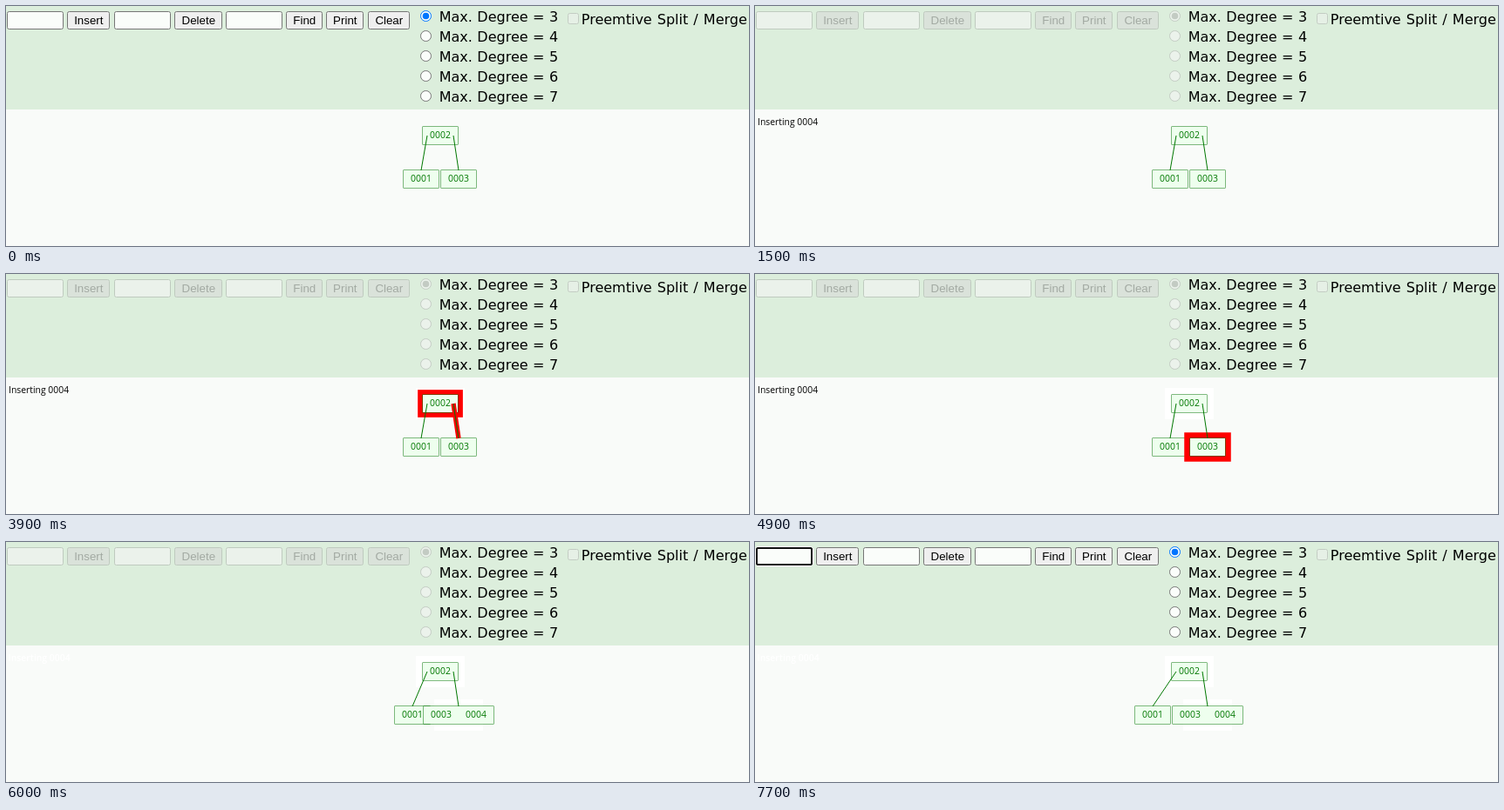
Animation of 852 by 276 pixels, one loop 8 s. Source, as an HTML page with a canvas:

```html
<!DOCTYPE html>
<html lang="en">
<head>
<meta charset="utf-8">
<title>B-Tree insertion</title>
<style>
  html, body { margin: 0; width: 100%; height: 100%; overflow: hidden; background: #f9fbf9; }
  canvas { display: block; width: 852px; height: 276px; }
</style>
</head>
<body>
<canvas id="stage" width="852" height="276"></canvas>
<script>
const ctx = document.getElementById('stage').getContext('2d');
const LOOP = 8000, STEP = 100;

const UI_FONT = '13.333px "Liberation Sans", Arial, sans-serif';
const LABEL_FONT = '16px "DejaVu Sans", Verdana, sans-serif';
const NODE_FONT = '10.4px "Open Sans", "Noto Sans", sans-serif';
const GREEN = '#007700', MINT = '#eeffee', RED = '#ff0000';

const FIELDS = [1, 124, 252];
const BUTTONS = [['Insert', 70, 49], ['Delete', 193, 55], ['Find', 321, 42], ['Print', 367, 43], ['Clear', 415, 48]];
const BUTTON_LOOK = {
  normal: ['#efefef', '#767676', '#000'],
  hover: ['#e5e5e5', '#4f4f4f', '#000'],
  active: ['#f5f5f5', '#8d8d8d', '#000'],
  disabled: ['#dae2da', '#bfcabf', '#a3aaa3']
};

const within = (t, from, to) => t >= from && t < to;
const clamp01 = v => Math.max(0, Math.min(1, v));

function text(str, x, y, font, color, align = 'left', gap = 0) {
  ctx.font = font;
  ctx.fillStyle = color;
  ctx.textAlign = align;
  ctx.wordSpacing = gap + 'px';
  ctx.fillText(str, x, y);
}

function outline(x, y, w, h, r, color, width) {
  ctx.beginPath();
  ctx.roundRect(x, y, w, h, r);
  ctx.strokeStyle = color;
  ctx.lineWidth = width;
  ctx.stroke();
}

// One-pixel border just inside the given box
function box(x, y, w, h, r, fill, stroke) {
  ctx.beginPath();
  ctx.roundRect(x + 0.5, y + 0.5, w - 1, h - 1, r);
  ctx.fillStyle = fill;
  ctx.fill();
  ctx.strokeStyle = stroke;
  ctx.lineWidth = 1;
  ctx.stroke();
}

function disc(x, y, r, fill, stroke) {
  ctx.beginPath();
  ctx.arc(x, y, r, 0, Math.PI * 2);
  ctx.fillStyle = fill;
  ctx.fill();
  if (!stroke) return;
  ctx.strokeStyle = stroke;
  ctx.lineWidth = 1;
  ctx.stroke();
}

function drawFields(t, off) {
  const hover = within(t, 400, 1200) || t >= 6800;
  const focus = within(t, 600, 1300) || t >= 7400;
  FIELDS.forEach((x, i) => {
    const edge = off ? '#bfcabf' : i === 0 && hover ? '#4f4f4f' : '#767676';
    box(x, 6, 65, 21, 2, off ? '#ebf2eb' : '#fafdfa', edge);
  });
  if (focus) {
    outline(0.5, 5.5, 66, 22, 3, '#fff', 1);
    outline(2, 7, 63, 19, 1.5, '#101010', 2);
  }
  const typed = within(t, 800, 1400);
  if (typed) text('4', 5, 21, UI_FONT, '#000');
  if (within(t, 600, 1300) || within(t, 7400, 7700)) {
    ctx.fillStyle = '#000';
    ctx.fillRect(typed ? 12 : 5, 9, 1, 15);
  }
}

function insertState(t) {
  if (t === 1300) return 'active';
  return t === 1200 || within(t, 6500, 6700) ? 'hover' : 'normal';
}

function drawButtons(t, off) {
  BUTTONS.forEach(([name, x, w], i) => {
    const state = off ? 'disabled' : i === 0 ? insertState(t) : 'normal';
    const [fill, edge, ink] = BUTTON_LOOK[state];
    box(x, 6, w, 21, 2, fill, edge);
    text(name, x + w / 2 + 0.3, 21, UI_FONT, ink, 'center');
  });
}

function drawOptions(off) {
  for (let i = 0; i < 5; i++) {
    const y = 11.5 + 23 * i;
    const on = i === 0;
    disc(481.5, y, 6, off ? '#ebf2eb' : '#fafdfa', off ? '#c3ccc3' : on ? '#0075ff' : '#767676');
    if (on) disc(481.5, y, 3.8, off ? '#c3cbc3' : '#0075ff');
    text('Max. Degree = ' + (i + 3), 496.7, 18 + 23 * i, LABEL_FONT, '#000', 'left', 0.4);
  }
  box(644, 8, 13, 13, 2, '#e6f0e6', '#c3ccc3');
  text('Preemtive Split / Merge', 659.8, 21, LABEL_FONT, '#000', 'left', 1);
}

// Triangle wave for the width of the red halo
function pulse(t) {
  const phase = Math.abs(((t - 3560) % 1540 + 1540) % 1540 - 770) / 770;
  return 2.7 + 4.8 * phase;
}

function halo(cx, cy, w, d, color) {
  const e = d + 0.5;
  ctx.fillStyle = color;
  ctx.fillRect(cx - w / 2 - e, cy - 10 - e, w + 2 * e, 20 + 2 * e);
}

// The fill covers the inner half of the border, leaving a thin soft line
function drawNode(cx, cy, keys, glow) {
  const w = 40 * keys.length, left = cx - w / 2;
  if (glow) halo(cx, cy, w, glow, RED);
  ctx.strokeStyle = GREEN;
  ctx.lineWidth = 1;
  ctx.strokeRect(left, cy - 10, w, 20);
  ctx.fillStyle = MINT;
  ctx.fillRect(left, cy - 10, w, 20);
  keys.forEach((key, i) => text(key, left + 20 + 40 * i, cy + 3, NODE_FONT, GREEN, 'center'));
}

function drawEdge(x1, x2, glow) {
  const line = (color, width) => {
    ctx.beginPath();
    ctx.moveTo(x1, 149);
    ctx.lineTo(x2, 189);
    ctx.strokeStyle = color;
    ctx.lineWidth = width;
    ctx.stroke();
  };
  if (glow) line(RED, glow);
  line(GREEN, 1);
}

function drawTree(t) {
  const d = pulse(t);
  const leafX = 476 - 20 * clamp01((t - 5500) / 1000);
  const merged = t >= 5500;

  // Cleared areas stay slightly whiter than the page
  if (t >= 3600) halo(498, 149, 40, 7.5, '#fff');
  if (t >= 5200) halo(519, 199, 40, 7.5, '#fff');

  drawNode(leafX, 199, ['0001']);
  drawNode(498, 149, ['0002'], within(t, 2500, 4500) && d);
  drawNode(519, 199, merged ? ['0003', '0004'] : ['0003'], within(t, 4500, 5500) && d);
  drawEdge(483, leafX);
  drawEdge(513, 519, within(t, 3500, 4500) && d);
}

function drawMessage(t) {
  if (within(t, 1500, 5500)) text('Inserting 0004', 3, 137, NODE_FONT, '#000');
  else if (t >= 5500) text('Inserting 0004', 2.5, 137, '600 ' + NODE_FONT, '#fff');
}

function render(now) {
  const t = Math.floor((now % LOOP) / STEP) * STEP;
  const off = within(t, 1400, 6500);
  ctx.fillStyle = '#f9fbf9';
  ctx.fillRect(0, 0, 852, 276);
  ctx.fillStyle = '#dceedc';
  ctx.fillRect(0, 0, 852, 119);
  drawFields(t, off);
  drawButtons(t, off);
  drawOptions(off);
  drawMessage(t);
  drawTree(t);
}

const start = performance.now();
function tick() {
  render(performance.now() - start);
  requestAnimationFrame(tick);
}
tick();
</script>
</body>
</html>
```
